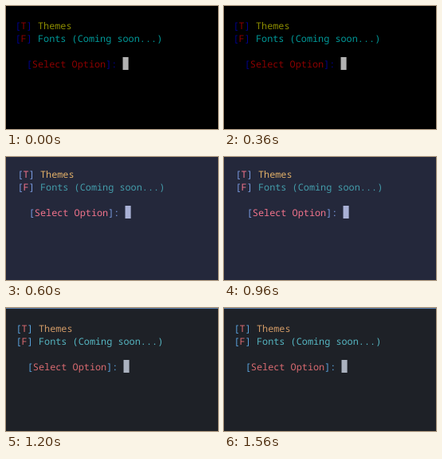
These frames come from a looping animation (266 px wide and 154 px high, 1800 ms). An HTML page with a canvas:

```html
<!DOCTYPE html>
<html lang="en">
<head>
<meta charset="utf-8">
<style>
  html, body { margin: 0; width: 100%; height: 100%; overflow: hidden; background: #000; }
  canvas { display: block; }
</style>
</head>
<body>
<canvas id="stage" width="266" height="154"></canvas>
<script>
const ctx = document.getElementById('stage').getContext('2d');
const HOLD = 600;
const LINE = 16;

// x, y: origin of the text grid (left edge, first baseline)
const themes = [
  { x: 11.5, y: 29, bg: '#000000', frame: '#00008b', key: '#8b0000',
    first: '#8b8b00', second: '#009898', cursor: '#b2b2b2' },
  { x: 14.5, y: 26, bg: '#24283b', frame: '#7a9ae0', key: '#f0738b',
    first: '#e0af68', second: '#449dab', cursor: '#a9b1d6' },
  { x: 12.5, y: 30, bg: '#1e2127', frame: '#5aa2dc', key: '#d86a70',
    first: '#d19a66', second: '#56b6c2', cursor: '#abb2bf', edge: '#5b80b0' }
];

// Draws coloured runs one after another and returns the end position.
function drawRuns(x, y, runs) {
  for (const [text, color] of runs) {
    ctx.fillStyle = color;
    ctx.fillText(text, x, y);
    x += ctx.measureText(text).width;
  }
  return x;
}

function drawMenu(t) {
  ctx.fillStyle = t.bg;
  ctx.fillRect(0, 0, 266, 154);
  if (t.edge) {
    ctx.fillStyle = t.edge;
    ctx.fillRect(0, 0, 266, 1);
  }
  ctx.font = '11.85px "Noto Sans Mono", monospace';
  ctx.textRendering = 'geometricPrecision';
  const item = (row, key, label, color) => drawRuns(t.x, t.y + row * LINE,
    [['[', t.frame], [key, t.key], ['] ', t.frame], [label, color]]);
  item(0, 'T', 'Themes', t.first);
  item(1, 'F', 'Fonts (Coming soon...)', t.second);
  const end = drawRuns(t.x, t.y + 3 * LINE,
    [['  [', t.frame], ['Select Option', t.key], [']: ', t.frame]]);
  ctx.fillStyle = t.cursor;
  ctx.fillRect(end, t.y + 35, ctx.measureText(' ').width, LINE);
}

let shown = -1;
function tick() {
  const index = Math.floor(performance.now() / HOLD) % themes.length;
  if (index !== shown) drawMenu(themes[shown = index]);
  requestAnimationFrame(tick);
}
tick();
</script>
</body>
</html>
```
